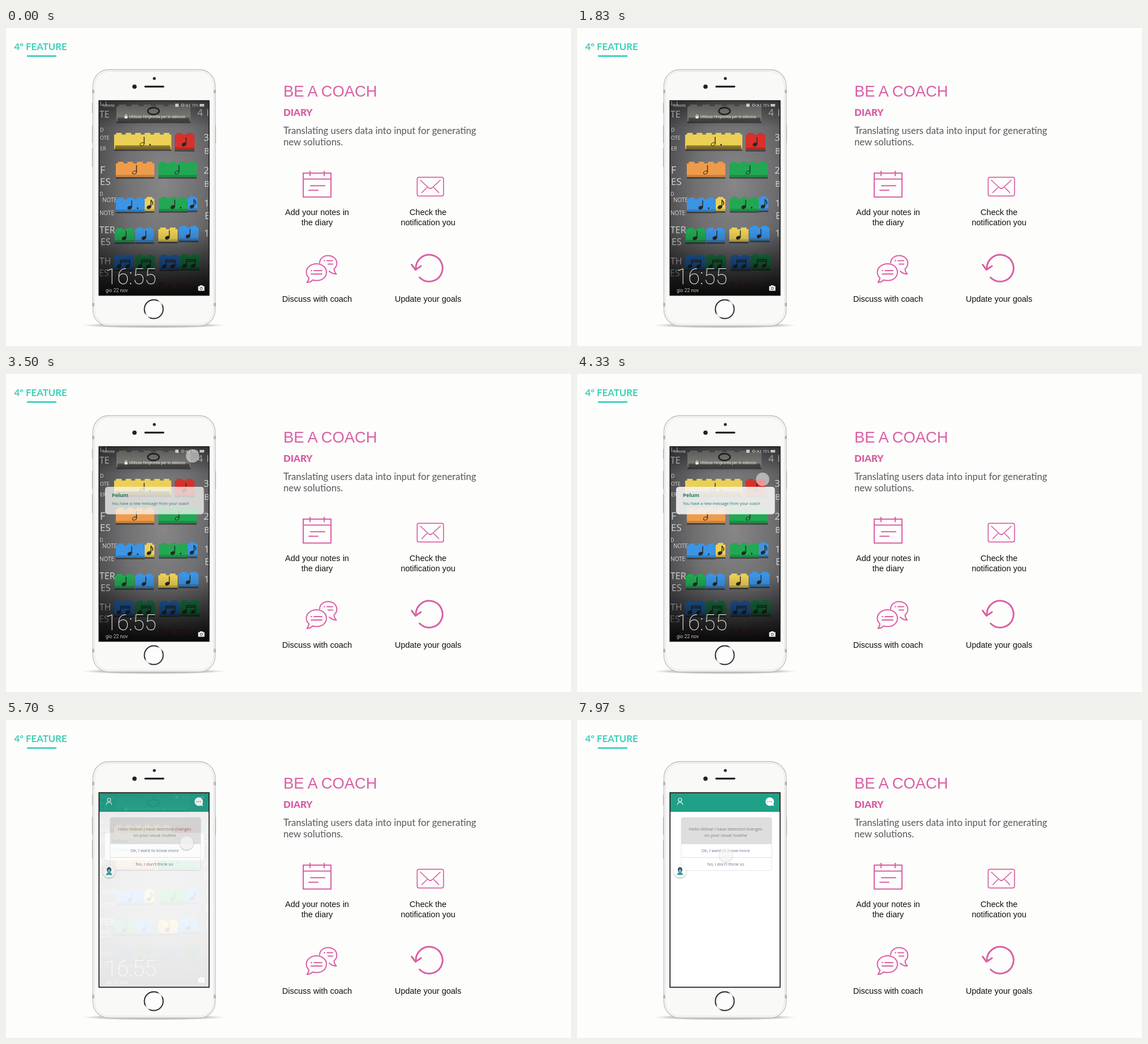
An HTML page that plays this animation: 998x561 px, repeating every 8000 ms.

```html
<!DOCTYPE html>
<html lang="en">
<head>
<meta charset="utf-8">
<title>Be a coach</title>
<style>
html, body { margin: 0; width: 100%; height: 100%; overflow: hidden; background: #fdfdfb; }
svg { display: block; width: 100vw; height: 100vh; }
.lato { font-family: Lato, sans-serif; }
.arial { font-family: "Liberation Sans", Arial, sans-serif; }
.open { font-family: "Open Sans", "Noto Sans", sans-serif; }
.robo { font-family: Roboto, sans-serif; }
.mid { text-anchor: middle; }
.icon { fill: none; stroke: #d960a4; stroke-width: 2; stroke-linecap: round; stroke-linejoin: round; }
</style>
</head>
<body>
<svg viewBox="0 0 998 561">
  <defs>
    <clipPath id="screen"><rect x="164" y="128" width="195" height="344"/></clipPath>
    <radialGradient id="wall" cx=".58" cy=".42" r=".72">
      <stop offset="0" stop-color="#878788"/><stop offset=".5" stop-color="#6f6f71"/><stop offset="1" stop-color="#434346"/>
    </radialGradient>
    <linearGradient id="dim" x2="0" y2="1">
      <stop offset="0" stop-color="#000" stop-opacity=".4"/><stop offset=".14" stop-color="#000" stop-opacity="0"/>
      <stop offset=".66" stop-color="#000" stop-opacity="0"/><stop offset=".86" stop-color="#000" stop-opacity=".5"/>
      <stop offset="1" stop-color="#000" stop-opacity=".9"/>
    </linearGradient>
    <linearGradient id="ring" x2="1" y2="1">
      <stop offset="0" stop-color="#333"/><stop offset=".35" stop-color="#222"/><stop offset=".46" stop-color="#e4e4e4"/>
      <stop offset=".54" stop-color="#e4e4e4"/><stop offset=".65" stop-color="#222"/><stop offset="1" stop-color="#444"/>
    </linearGradient>
    <radialGradient id="ground">
      <stop offset="0" stop-color="#888" stop-opacity=".75"/><stop offset=".75" stop-color="#999" stop-opacity=".5"/>
      <stop offset="1" stop-color="#aaa" stop-opacity="0"/>
    </radialGradient>
    <filter id="soft" x="-50%" y="-50%" width="200%" height="200%">
      <feDropShadow dx="0" dy="1" stdDeviation="1.3" flood-color="#000" flood-opacity=".4"/>
    </filter>
  </defs>
  <rect width="998" height="561" fill="#fdfdfb"/>

  <g class="lato">
    <text x="14.5" y="39" font-size="16.8" font-weight="700" fill="#3fd0b9">4º FEATURE</text>
    <rect x="37" y="48.3" width="52" height="2.4" fill="#22c8b1"/>
    <text x="490" y="155" font-size="16.8" font-weight="900" fill="#d960a4">DIARY</text>
    <g font-size="16.7" fill="#58585c">
      <text x="490" y="186.8">Translating users data into input for generating</text>
      <text x="490" y="206.8">new solutions.</text>
    </g>
  </g>
  <text class="arial" x="490" y="121" font-size="27.3" fill="#d960a4">BE A COACH</text>
  <g class="arial mid" font-size="14.5" fill="#111">
    <text x="549.5" y="330">Add your notes in</text><text x="549.5" y="347.5">the diary</text>
    <text x="745.5" y="330">Check the</text><text x="745.5" y="347.5">notification you</text>
    <text x="549.5" y="482.5">Discuss with coach</text><text x="745.5" y="482.5">Update your goals</text>
  </g>

  <g class="icon">
    <path stroke-linejoin="miter" d="M525 256H574V298.3H525ZM525 266.5H574M537 252.8V260.5M562 252.8V260.5M538 278.3H563M535 286.3H551"/>
    <g stroke-width="1.7">
      <rect x="726.3" y="263.3" width="46.5" height="33" rx="3"/>
      <path d="M732 268.5L746.5 282Q749.5 284.5 752.5 282L767 268.5M734.5 290.5L743.5 281.5M764.5 290.5L755.5 281.5"/>
    </g>
    <path d="M554 414.5C554 407 560.5 401.5 569 401.5C577.5 401.5 584.3 407.300 584.3 415C584.3 419 582.5 422.5 579.5 425C579.5 428.5 581 431.500 583.5 434C578.5 434 574 432 571 429M562 410.5H563M567 410.5H577M569 416.5H577"/>
    <path d="M548.500 416C558.500 416 566 422.500 566 431C566 439.500 558.500 445.500 548.500 445.500C546 445.500 543.500 445.200 541.500 444.500C539 447.500 535.500 448.800 531.500 448.800C533.500 446.500 535 443.500 535 440.500C532 438 530.500 434.800 530.500 431C530.500 422.500 538.500 416 548.500 416ZM539 428H540M544 428H558M539 434H558"/>
    <path stroke-width="3" d="M724 425A23.6 23.6 0 1 1 730.5 440"/>
    <path stroke-width="3" d="M716.5 417.5L723.3 426.5L733 420"/>
  </g>

  <ellipse cx="261" cy="524.5" rx="127" ry="5" fill="url(#ground)"/>
  <path d="M152.6 132V150M152.6 171V203M152.6 212V245M370.2 171V203" stroke="#c6c6c9" stroke-width="1.7"/>
  <rect x="153.5" y="73.5" width="216" height="452" rx="28" fill="#f9f9f8" stroke="#bdbdbf" stroke-width="1.3"/>
  <rect x="156.5" y="76.5" width="210" height="446" rx="25.5" fill="none" stroke="#e3e3e3"/>
  <path d="M154 109V115M369 109V115M154 485V491M369 485V491" stroke="#aaa" stroke-width="3"/>
  <circle cx="262" cy="89" r="2.6" fill="#222"/>
  <circle cx="227" cy="103.5" r="3.8" fill="#222"/>
  <path d="M246 103.3H278" stroke="#222" stroke-width="3.2" stroke-linecap="round"/>
  <circle cx="261" cy="496" r="16.6" fill="#fdfdfd" stroke="url(#ring)" stroke-width="2"/>

  <g clip-path="url(#screen)">
    <rect x="164" y="128" width="195" height="344" fill="url(#wall)"/>
    <g id="chalk" class="open" fill="#e6e6e6" fill-opacity=".88"></g>
    <g id="bricks"></g>
    <path d="M208 466V452M213 466H222M272 466V451H281M288 466V452L296 466M302 464V452H312M320 466V451M328 458H338M343 464H352" stroke="#a01818" stroke-opacity=".7" stroke-width="2" fill="none"/>
    <rect x="164" y="128" width="195" height="344" fill="url(#dim)"/>
    <g class="robo" fill="#fff">
      <g font-size="6.4" fill-opacity=".7">
        <text x="169.5" y="138.5">Telvoria</text><text x="328" y="138.8">70%</text>
        <path d="M299 133.5h6v5.5h-6zM342 134h8v4.5h-8z"/>
        <path d="M309 136l3-2.5l3 2.5l-3 2.5zM317.5 134l5 5m0-5l-5 5M324.5 139v-5" stroke="#ccc" stroke-width=".9" fill="none"/>
      </g>
      <path d="M209.5 155.500h5v4h-5z"/>
      <path d="M210.500 155.500V154.200a1.500 1.500 0 0 1 3 0V155.500" fill="none" stroke="#fff" stroke-width=".8"/>
      <text x="217.5" y="159" font-size="6.9" fill-opacity=".85">Utilizza l'impronta per lo sblocco</text>
      <text x="175.5" y="451.5" font-size="38" font-weight="200">16:55</text>
      <text x="176" y="465.5" font-size="8.5" fill-opacity=".75">gio 22 nov</text>
      <path d="M339.5 455.5h2.5l1-1.5h4l1 1.5h2.5v8h-11z"/>
      <circle cx="345" cy="459.3" r="2.2" fill="#eee" stroke="#333"/>
    </g>

    <g id="notice">
      <rect x="175" y="199" width="174.5" height="48.5" rx="5" fill="#f4f4f2" fill-opacity=".9"/>
      <g class="open" fill="#1c7c66">
        <text x="187" y="217" font-size="9.2" font-weight="700">Pelum</text>
        <text x="187" y="231.3" font-size="7">You have a new message from your coach</text>
      </g>
    </g>

    <g id="chat">
      <rect x="164" y="128" width="195" height="344" fill="#fff"/>
      <rect x="164" y="128" width="195" height="34" fill="#1fa188"/>
      <g fill="none" stroke="#fff" stroke-width="1.1">
        <circle cx="182" cy="141" r="3"/><path d="M177.3 149.8C177.3 143.7 186.7 143.7 186.7 149.8"/>
      </g>
      <circle cx="340.5" cy="144" r="7.5" fill="#fff"/>
      <path d="M343 150.500L348 151.700L346.500 147Z" fill="#fff"/>
      <path d="M336.5 144h1.600M339.700 144h1.600M342.900 144h1.600" stroke="#1fa188" stroke-width="1.5"/>
      <rect x="184" y="172" width="160" height="93.5" rx="3" fill="#fff" stroke="#e6e6ee"/>
      <path d="M184 219V175a3 3 0 0 1 3-3H341a3 3 0 0 1 3 3V219Z" fill="#dedede"/>
      <path d="M184 242.5H344" stroke="#dcdce8"/>
      <g class="open mid" font-size="7.5" fill="#7b7b85">
        <text x="262.5" y="195">Hello Velina! I have detected changes</text>
        <text x="262.5" y="206.3">on your usual routine</text>
        <g fill="#6b6b92">
          <text x="262.5" y="232.7">Ok, I want to know more</text>
          <text x="262.5" y="256.7">No, i don't think so</text>
        </g>
      </g>
      <circle cx="182" cy="267" r="11" fill="#fff" filter="url(#soft)"/>
      <path d="M176.8 273.5C176.8 267 187.2 267 187.2 273.5Z" fill="#27a58f"/>
      <ellipse cx="182" cy="264.3" rx="4" ry="4.8" fill="#2d5275"/>
      <ellipse cx="182" cy="266" rx="2.2" ry="2.7" fill="#79b9c5"/>
    </g>

    <circle id="touch" r="11.8" fill="#f2f2f2" filter="url(#soft)"/>
  </g>
  <rect x="164.3" y="128.3" width="194.4" height="343.2" fill="none" stroke="#161616" stroke-width="1.7"/>
</svg>

<script>
const $ = id => document.getElementById(id);
const LOOP = 8000;
const INK = '#2a2622';
const hue = { k: '#8d8d88', y: '#ecd055', r: '#d8302a', o: '#ee9c4c', g: '#22a853', b: '#3c94e4', n: '#2168b8', d: '#178248' };

// Brick: colour, left, top, width, height, studs, note kind
const bricks = [
  ['k', 195, 138, 131, 27, 6, 'whole'],
  ['y', 191, 188, 101, 26, 6, 'half.'], ['r', 298, 188, 35, 27, 2, 'quarter'],
  ['o', 194, 239, 68, 24, 4, 'half'], ['g', 269, 239, 68, 24, 4, 'half'],
  ['b', 194, 302, 51, 22, 3, 'quarter.'], ['y', 245, 301, 17, 22, 1, 'eighth'],
  ['g', 270, 301, 51, 22, 3, 'quarter.'], ['b', 321, 300, 17, 22, 1, 'eighth'],
  ['g', 192, 356, 35, 22, 2, 'quarter'], ['b', 228, 355, 33, 23, 2, 'quarter'],
  ['y', 269, 355, 34, 22, 2, 'quarter'], ['b', 305, 352, 35, 23, 2, 'quarter'],
  ['n', 191, 403, 35, 23, 2, 'pair'], ['d', 228, 403, 35, 23, 2, 'pair'],
  ['n', 271, 403, 35, 23, 2, 'pair'], ['d', 307, 402, 35, 23, 2, 'pair']
];

function note(kind, x, y) {
  if (kind === 'whole') return `<ellipse cx="${x}" cy="${y - 5}" rx="10" ry="6" fill="none" stroke="${INK}" stroke-width="2.5"/>`;
  const head = (hx, hy) => `<ellipse cx="${hx}" cy="${hy}" rx="3.6" ry="2.6" transform="rotate(-25 ${hx} ${hy})" stroke="${INK}" fill="${kind.startsWith('half') ? 'none' : INK}"/>`;
  const line = d => `<path d="${d}" fill="none" stroke="${INK}" stroke-width="1.4"/>`;
  if (kind === 'pair') return head(x - 9, y + 6) + head(x + 6, y + 6) + line(`M${x - 6} ${y + 6}V${y - 5}H${x + 10}V${y + 6}M${x - 6} ${y - 2}H${x + 10}`);
  let out = head(x - 1, y + 4) + line(`M${x + 2.5} ${y + 3}V${y - 9}`);
  if (kind === 'eighth') out += line(`M${x + 2.5} ${y - 9}q1 3 3 4q1 3-1 5`);
  if (kind.endsWith('.')) out += `<circle cx="${x + 13}" cy="${y + 5}" r="1.4" fill="${INK}"/>`;
  return out;
}

function brick([c, x, y, w, h, studs, kind]) {
  const step = w / studs;
  const box = (bx, by, bw, bh, fill, alpha = 1) =>
    `<rect x="${bx}" y="${by}" width="${bw}" height="${bh}" rx=".8" fill="${fill}" opacity="${alpha}"/>`;
  let out = box(x, y + h - 1, w, 4, '#000', .4);
  for (let i = 0; i < studs; i++) out += box(x + step * (i + .2), y - 3, step * .6, 5, hue[c]);
  out += box(x, y, w, h, hue[c]) + box(x, y + h - 4, w, 4, '#000', .16);
  if (w > 90) out += box(x + 2, y + h - 7, w - 4, 7, '#000', .4);
  return out + note(kind, x + w / 2, y + h / 2);
}

// Lettering on the wall: text, left, baseline, size
const chalk = [
  ['LT', 165, 137, 15], ['TE', 165, 158, 16], ['D', 166, 183, 9], ['OTE', 166, 197, 9], ['ER', 166, 216, 9],
  ['F', 166, 257, 18], ['ES', 166, 277, 17], ['D', 165, 296, 9], ['NOTE', 170, 307, 10], ['NOTE', 165, 330, 10],
  ['TER', 165, 362, 16], ['ES', 167, 383, 16], ['TH', 165, 417, 16], ['ES', 164, 438, 16],
  ['4', 338, 155, 17], ['I', 354, 155, 17], ['3', 349, 199, 17], ['B', 350, 222, 15], ['2', 349, 257, 17],
  ['B', 350, 280, 15], ['1', 350, 315, 16], ['E', 351, 337, 16], ['1', 350, 368, 16]
];

$('bricks').innerHTML = bricks.map(brick).join('');
$('chalk').innerHTML = chalk.map(([s, x, y, size]) => `<text x="${x}" y="${y}" font-size="${size}">${s}</text>`).join('');

const ease = (t, from, to) => {
  const u = Math.min(1, Math.max(0, (t - from) / (to - from)));
  return u * u * (3 - 2 * u);
};
const mix = (a, b, u) => a + (b - a) * u;

function draw(t) {
  $('notice').setAttribute('opacity', ease(t, 2900, 3700));
  $('chat').setAttribute('opacity', ease(t, 5380, 5780));

  const drop = ease(t, 2305, 5455);
  const slide = ease(t, 6500, 8000);
  const x = mix(322 + 36 * drop - 39 * drop * drop, 263, slide);
  const y = mix(mix(110, 217, drop), 238, slide);
  const touch = $('touch');
  touch.setAttribute('transform', `translate(${x} ${y})`);
  touch.setAttribute('opacity', mix(mix(.55, .88, ease(t, 4300, 5300)), .6, slide));
  touch.setAttribute('visibility', t < 2350 ? 'hidden' : 'visible');
}

const start = performance.now();
function tick() {
  draw((performance.now() - start) % LOOP);
  requestAnimationFrame(tick);
}
tick();
</script>
</body>
</html>
```
